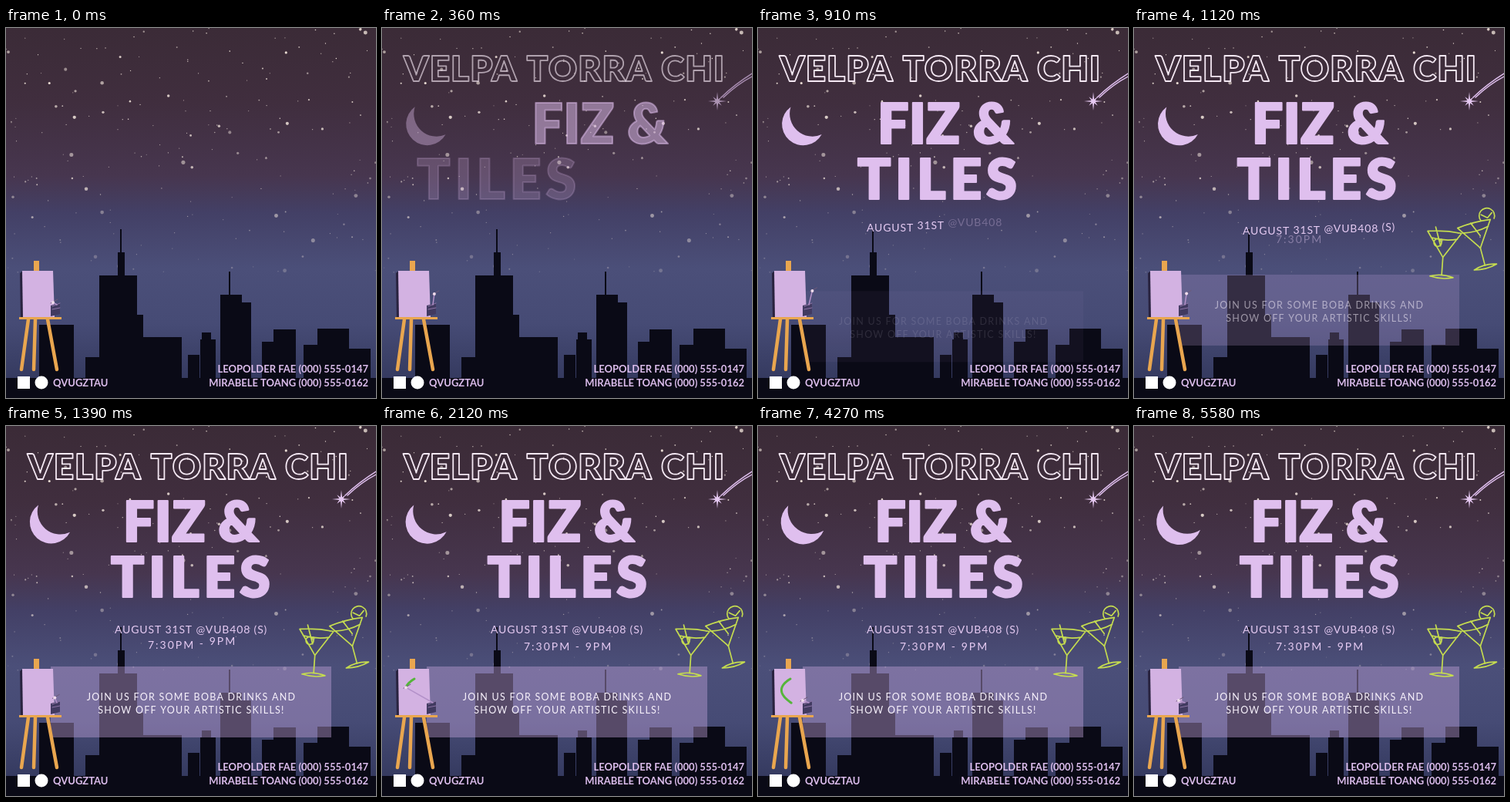
Write an HTML page with a canvas that moves like this. It is 480x480 px and loops after 5610 ms.

```html
<!DOCTYPE html>
<html lang="en">
<head>
<meta charset="utf-8">
<style>
html, body { margin: 0; width: 100%; height: 100%; overflow: hidden; background: #3b2c39; }
canvas { display: block; width: 480px; height: 480px; }
</style>
</head>
<body>
<canvas id="stage" width="480" height="480"></canvas>
<script>
const LOOP = 5610;
const LILAC = '#dfbfee';
const WOOD = '#e9a64f';
const FONT = 'Lato, "Open Sans", sans-serif';
const ctx = document.getElementById('stage').getContext('2d');

const clamp = v => Math.max(0, Math.min(1, v));
const ramp = (t, start, length) => clamp((t - start) / length);
const mix = (a, b, p) => a.map((v, i) => v + (b[i] - v) * p);

// Runs a drawing with its own transform and opacity.
function layer(alpha, x, y, draw) {
  if (alpha <= 0) return;
  ctx.save();
  ctx.globalAlpha = alpha;
  ctx.translate(x, y);
  draw();
  ctx.restore();
}

function fill(path, color) {
  ctx.fillStyle = color;
  ctx.fill(new Path2D(path));
}

function stroke(path, color, width) {
  ctx.strokeStyle = color;
  ctx.lineWidth = width;
  ctx.lineCap = ctx.lineJoin = 'round';
  ctx.stroke(new Path2D(path));
}

function rect(x, y, w, h, color) {
  ctx.fillStyle = color;
  ctx.fillRect(x, y, w, h);
}

function dot(x, y, r, color) {
  ctx.beginPath();
  ctx.arc(x, y, r, 0, 7);
  ctx.fillStyle = color;
  ctx.fill();
}

function type(size, weight, spacing, align, color) {
  ctx.font = `${weight} ${size}px ${FONT}`;
  ctx.letterSpacing = spacing + 'px';
  ctx.textAlign = align;
  ctx.fillStyle = ctx.strokeStyle = color;
}

function seeded(seed) {
  return () => (seed = seed * 16807 % 2147483647) / 2147483647;
}

function sky() {
  const g = ctx.createLinearGradient(0, 0, 0, 480);
  [[0, '#3b2b37'], [.2, '#402e3e'], [.4, '#47364f'], [.5, '#434066'],
    [.65, '#4b4f79'], [.8, '#464b75'], [1, '#2f3458']].forEach(stop => g.addColorStop(...stop));
  rect(0, 0, 480, 480, g);

  const rnd = seeded(77);
  for (let i = 0; i < 190; i++) {
    const x = rnd() * 480, y = rnd() ** 1.2 * 320;
    ctx.globalAlpha = (.5 + .5 * rnd()) * (1 - (y / 340) ** 2 * .8);
    dot(x, y, .6 + 2 * rnd() ** 4, '#f6e9df');
  }
  ctx.globalAlpha = 1;
}

// Each building: left edge, width, top.
const buildings = [
  [0, 480, 454], [43, 45, 385], [103, 18, 427],
  [121, 49, 321], [145, 9, 291], [148, 2, 261], [170, 8, 372], [178, 50, 401],
  [236, 15, 424], [252, 20, 404], [254, 12, 395],
  [278, 28, 346], [289, 2, 316], [306, 12, 356],
  [332, 44, 407], [347, 29, 391], [386, 18, 411], [404, 41, 390], [445, 28, 416]
];

function skyline() {
  for (const [x, w, top] of buildings) rect(x, top, w, 480 - top, '#0a0a16');
}

// Point on the painted curve.
function brushTip(p) {
  const a = [42, 328], b = [17, 343], c = [46, 361];
  return mix(mix(a, b, p), mix(b, c, p), p);
}

function handAt(t) {
  const swing = Math.sin(Math.PI * Math.min(t, 1500) / 1500);
  const waiting = [61 + 10 * swing, 356 - 16 * swing];
  const painting = mix(waiting, brushTip(ramp(t, 1600, 1450)), ramp(t, 1450, 200));
  return mix(painting, [58, 356], ramp(t, 3060, 300));
}

function easel(t) {
  for (const [top, foot] of [[29, 20], [38, 36], [54, 66]]) {
    stroke(`M${top} 378L${foot} 443`, WOOD, 4.5);
  }
  rect(36, 302, 7, 16, WOOD);
  fill('M18 318L22 315L23 376L19 376Z', '#29233f');
  fill('M21 315H61L63 375L22 376Z', '#d3b2e2');
  rect(17, 375, 55, 3, WOOD);

  const painted = t < 5200 ? ramp(t, 1600, 1450) : 0;
  if (painted) {
    let path = 'M42 328';
    for (let p = 0; p <= painted; p += .05) path += 'L' + brushTip(p);
    stroke(path, '#55b53a', 3);
  }
  const [x, y] = handAt(t);
  fill('M58 360L70 357V371L58 374Z', '#413a60');
  stroke('M60 361L70 357M60 365L70 363', '#8d74a6', 1);
  stroke(`M66 359L${x} ${y}`, '#b391c9', 1.5);
  stroke(`M${x - 3} ${y + 1}L${x + 6} ${y - 4}`, '#6d5a78', 1);
  dot(x, y, 2, '#f0dcec');
}

function moon(t) {
  const p = ramp(t, 640, 4940);
  layer(ramp(t, 120, 620), 57.5, 125.5, () => {
    ctx.rotate(.04 - .16 * p);
    ctx.scale(.98 + .07 * p, .98 + .07 * p);
    fill('M-16-23A28 28 0 1 0 26 12A30 30 0 0 1-16-23Z', LILAC);
  });
}

function shootingStar(t) {
  layer(ramp(t, 100, 400), 435, 95, () => {
    stroke('M5-5Q24-23 47-37M8-5Q27-23 47-33', LILAC, 1.5);
    ctx.beginPath();
    for (let i = 0; i < 16; i++) {
      const r = i % 2 ? 2.8 : i % 4 ? 8 : 12, a = i * Math.PI / 8;
      ctx.lineTo(r * Math.sin(a), -r * Math.cos(a));
    }
    ctx.fillStyle = '#e6c9f2';
    ctx.fill();
  });
}

function glass(x, y, angle, garnish) {
  ctx.save();
  ctx.translate(x, y);
  ctx.rotate(angle);
  stroke('M-22 0Q0-3 22 0L1 31Q0 34-1 31ZM-17 8Q0 12 17 8M0 33V56'
    + 'M-15 58Q0 53 15 58Q0 62-15 58' + garnish, '#c5dc4f', 1.7);
  ctx.restore();
}

function drinks(t) {
  const alpha = t < 540 ? 0 : t < 700 ? .8 : t < 1000 ? 0 : 1;
  layer(alpha, 0, 0, () => {
    glass(403, 265, .07, 'M-12-6L-4 18M-13 14a5 5 0 1 0 10 0a5 5 0 1 0-10 0');
    glass(441, 254, -.26, 'M10-1A10 10 0 1 1 27 0M19-3L12-9M19-3L26-8M-4-2L4 17');
  });
}

function heading(t) {
  type(46, 900, 1, 'left', '#f5e9f4');
  ctx.lineWidth = 1.8;
  ctx.lineJoin = 'round';
  layer(ramp(t, 60, 480), 28, 69, () => ctx.strokeText('VELPA TORRA CHI', 0, 0));

  const slide = (text, x, y, start, dir, spacing) => {
    const shift = dir * 150 * Math.exp(-Math.max(0, t - start) / 225);
    layer(ramp(t, start, 550), x + shift, y, () => {
      type(72, 900, spacing, 'center', LILAC);
      ctx.lineWidth = 2;
      ctx.fillText(text, 0, 0);
      ctx.strokeText(text, 0, 0);
    });
  };
  slide('FIZ &', 239.5, 150, 80, 1, 0);
  slide('TILES', 243, 222, 250, -1, 5.5);
}

// Words drop into place one after another.
function dropWords(t, text, x, y, spacing, start) {
  type(14, 400, spacing, 'left', '#e6cbf3');
  for (const word of text.split(' ')) {
    const p = ramp(t, start, 500);
    layer(clamp(p * 5), x, y - 14 * (1 - p) ** 2, () => ctx.fillText(word, 0, 0));
    x += ctx.measureText(word + ' ').width;
    start += 80;
  }
}

function panel(t) {
  const p = ramp(t, 850, 500);
  layer(p, 58, 312 + 38 * (1 - p) ** 2, () => {
    rect(0, 0, 364, 92, 'rgba(192, 162, 218, .42)');
    type(12.5, 400, 1.25, 'center', '#f7f1fb');
    ctx.fillText('JOIN US FOR SOME BOBA DRINKS AND', 182.5, 44);
    ctx.fillText('SHOW OFF YOUR ARTISTIC SKILLS!', 182.5, 61);
  });
}

function contacts() {
  rect(15, 452, 16, 16, '#fff');
  dot(46, 460, 8.5, '#fff');
  type(13, 700, 0, 'left', '#dcbdec');
  ctx.fillText('QVUGZTAU', 61, 465);
  ctx.textAlign = 'right';
  ctx.fillText('LEOPOLDER FAE (000) 555-0147', 470, 447);
  ctx.fillText('MIRABELE TOANG (000) 555-0162', 470, 465);
}

function frame(now) {
  const t = now % LOOP;
  sky();
  skyline();
  panel(t);
  easel(t);
  moon(t);
  shootingStar(t);
  drinks(t);
  heading(t);
  dropWords(t, 'AUGUST 31ST @VUB408 (S)', 141, 269, .85, 720);
  dropWords(t, '7:30PM - 9PM', 184, 291, 2, 1080);
  contacts();
  requestAnimationFrame(frame);
}
requestAnimationFrame(frame);
</script>
</body>
</html>
```
